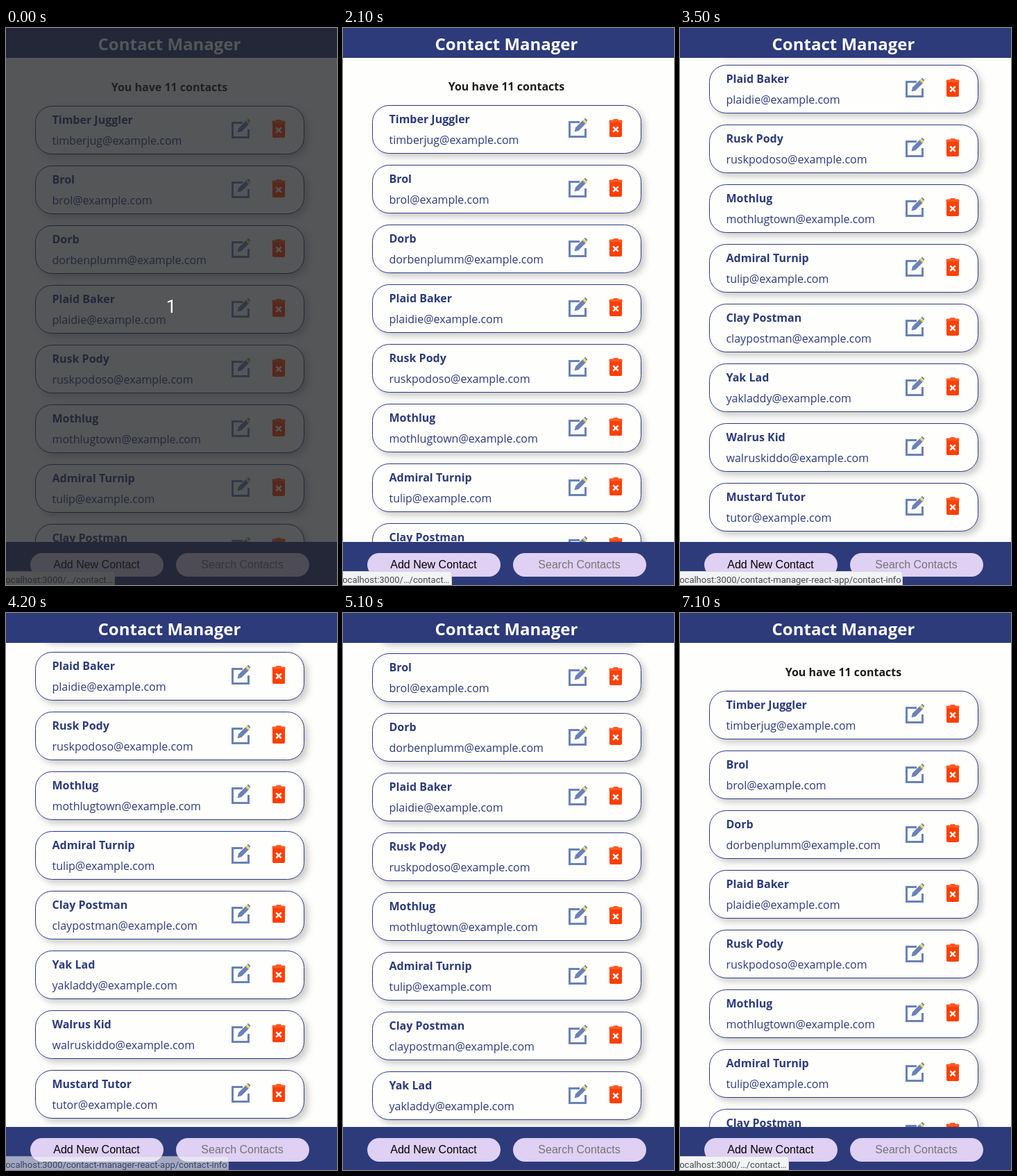
Write an HTML page that moves like this. It is 477 px wide and 802 px high and loops after 8000 ms.

```html
<!DOCTYPE html>
<html lang="en">
<head>
<meta charset="utf-8">
<title>Contact Manager</title>
<style>
  html, body { margin: 0; width: 100%; height: 100%; overflow: hidden; background: #fefefd; }
  svg { display: block; width: 477px; height: 802px; }
  text { font: 16px "Open Sans", sans-serif; white-space: pre; }
  .bold { font-weight: 700; }
  .mid { text-anchor: middle; }
  .card text { fill: #2d3b7b; }
  .control { font-family: "Liberation Sans", Arial, sans-serif; }
  #url { font: 13px Roboto, sans-serif; fill: #45474b; }
  #count { font: 26px Roboto, sans-serif; fill: #fff; }
</style>
</head>
<body>
<svg viewBox="0 0 477 802">
  <defs>
    <filter id="shadow" x="-10%" y="-5%" width="120%" height="110%">
      <feDropShadow dx="5" dy="5" stdDeviation="5" flood-color="#000" flood-opacity=".2"/>
    </filter>
    <g id="edit">
      <path d="M341 24.5H326.5V45.5H349.5V34" fill="none" stroke="#6a82b7" stroke-width="3"/>
      <path d="M333.5 38.5L335 32.5L346 21.5L350.5 26L339.5 37Z" fill="#6a82b7"/>
      <path d="M345 22.5L347 20.5L351.5 25L349.5 27Z" fill="#ead653"/>
      <path d="M347.5 20L349 18.8L352.3 22L351 24Z" fill="#6a82b7"/>
    </g>
    <g id="trash">
      <path d="M383.5 25V23Q383.5 21.5 385 21.5H389L390 20H396L397 21.5H401Q402.500 21.5 402.500 23V25Z" fill="#ff5a25"/>
      <path d="M384 25H402V44Q402 46 400 46H386Q384 46 384 44Z" fill="#ff4003"/>
      <path d="M389.300 31.300L396.700 38.700M396.700 31.300L389.300 38.700" stroke="#fff" stroke-width="2.400"/>
    </g>
  </defs>
  <rect width="477" height="802" fill="#fefefd"/>
  <g id="list">
    <text x="235.500" y="91" class="bold mid" fill="#1c1c1c">You have 11 contacts</text>
    <g id="boxes" filter="url(#shadow)"></g>
    <g id="rows"></g>
  </g>
  <rect width="477" height="43" fill="#2d3b7b"/>
  <text x="235.500" y="32" class="bold mid" fill="#fff" style="font-size:24px">Contact Manager</text>
  <rect y="740" width="477" height="62" fill="#2d3b7b"/>
  <g fill="#dfd0f4">
    <rect x="35" y="756" width="192" height="34" rx="17"/>
    <rect x="245" y="756" width="192" height="34" rx="17"/>
  </g>
  <text x="130.500" y="778" class="control mid">Add New Contact</text>
  <text x="340.500" y="778" class="control mid" fill="#757575">Search Contacts</text>
  <g id="status">
    <rect id="bubble" x="-6" y="782.500" height="26" rx="3" fill="#f2f3f4" stroke="#d3d5d8"/>
    <text id="url" x="-4" y="799"></text>
  </g>
  <g id="overlay">
    <rect width="477" height="802" fill="#202124" opacity=".76"/>
    <text id="count" x="238" y="410" class="mid">1</text>
  </g>
</svg>
<script>
const LOOP = 8000, STEP = 100;
const $ = id => document.getElementById(id);

const contacts = [
  ['Timber Juggler', 'timberjug'], ['Brol', 'brol'], ['Dorb', 'dorbenplumm'],
  ['Plaid Baker', 'plaidie'], ['Rusk Pody', 'ruskpodoso'], ['Mothlug', 'mothlugtown'],
  ['Admiral Turnip', 'tulip'], ['Clay Postman', 'claypostman'], ['Yak Lad', 'yakladdy'],
  ['Walrus Kid', 'walruskiddo'], ['Mustard Tutor', 'tutor']
];
const cardTop = i => 112 + 86 * i;

$('boxes').innerHTML = contacts.map((_, i) =>
  `<rect x="42.5" y="${cardTop(i) + .5}" width="387" height="69" rx="24" fill="#fefefd" stroke="#2d3b7b"/>`
).join('');
$('rows').innerHTML = contacts.map(([name, user], i) =>
  `<g class="card" transform="translate(0 ${cardTop(i)})">
    <text x="66.5" y="26" class="bold">${name}</text>
    <text x="66.5" y="56">${user}@example.com</text>
    <use href="#edit"/><use href="#trash"/>
  </g>`
).join('');

// Wheel bursts: start time, resting offset, then the offset after each step
const bursts = [
  [2100, 1, 22, 58, 92, 106],
  [2800, 125, 184, 208, 212],
  [3400, 262, 317, 318],
  [4200, 314, 296, 265, 228, 197, 169, 159],
  [5100, 140, 95, 40, 8, 0]
];

function scrollAt(t) {
  let offset = 0;
  for (const [start, ...stops] of bursts) {
    if (t < start) break;
    offset = stops[Math.min(stops.length - 1, (t - start) / STEP)];
  }
  return offset;
}

const clamp = v => Math.max(0, Math.min(1, v));

function statusAt(t) {
  const shown = t < 6000 ? 1 - clamp((t - 4100) / 250) : clamp((t - 6900) / 200);
  const grow = t < 6000 ? clamp((t - 2770) / 190) : 0;
  const path = grow === 1 ? 'contact-manager-react-app/contact-info'
    : grow > .5 ? '…/contact-i…' : '…/contact…';
  return { shown, width: 157 + 164 * grow, text: 'localhost:3000/' + path };
}

function draw(now) {
  const t = Math.floor(now % LOOP / STEP) * STEP;
  $('list').setAttribute('transform', `translate(0 ${-scrollAt(t)})`);

  const status = statusAt(t);
  $('status').setAttribute('opacity', status.shown);
  $('bubble').setAttribute('width', status.width + 5.5);
  $('url').textContent = status.text;

  $('overlay').setAttribute('opacity', 1 - clamp(t / 200));
  $('count').setAttribute('opacity', t < STEP ? 1 : 0);
}

const origin = performance.now();
function tick() {
  draw(performance.now() - origin);
  requestAnimationFrame(tick);
}
tick();
</script>
</body>
</html>
```
